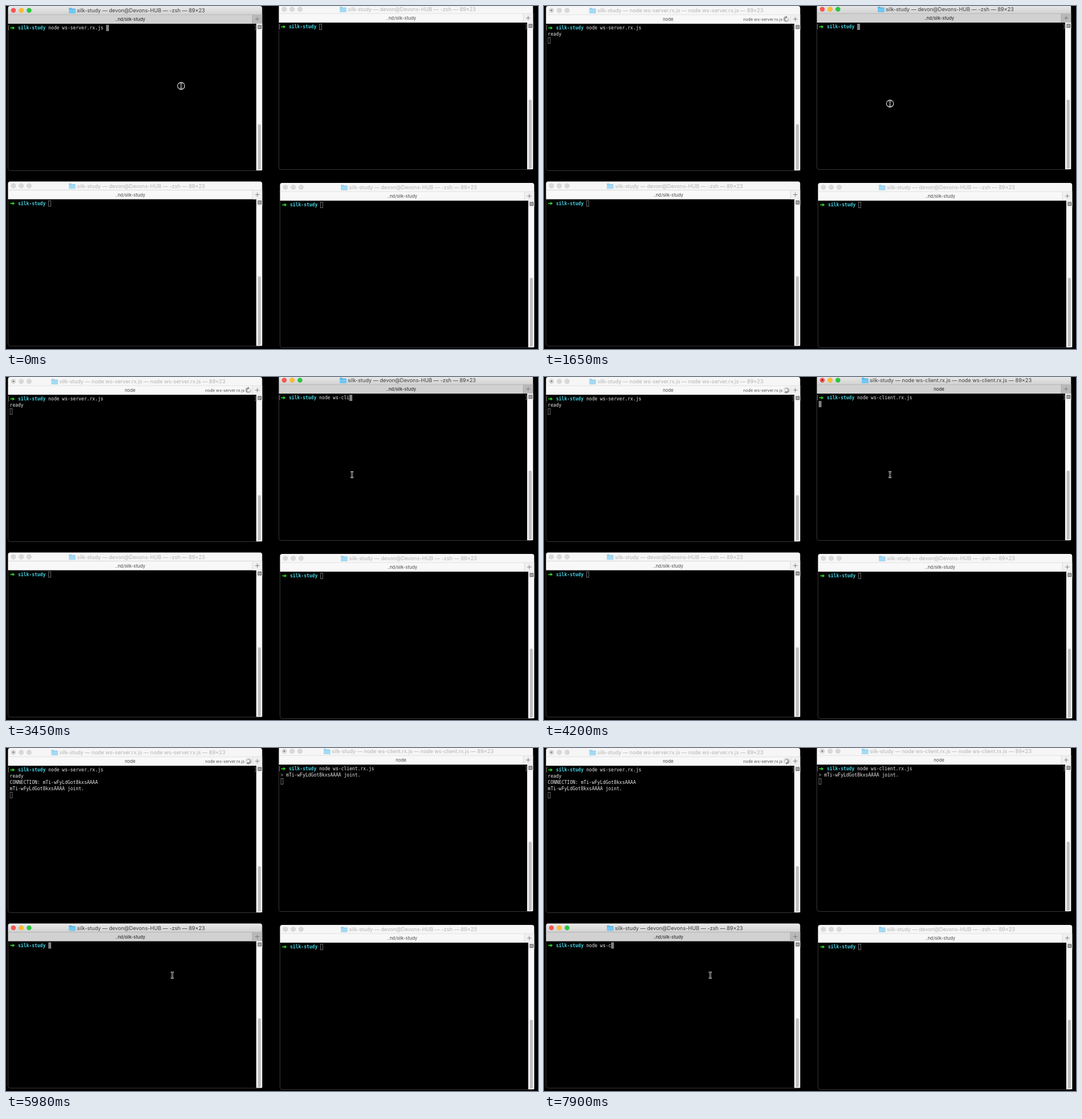
Animation of 931 by 601 pixels, one loop 8 s. Source, as an HTML page:

```html
<!DOCTYPE html>
<html lang="en">
<head>
<meta charset="utf-8">
<title>Four terminals</title>
<style>
html, body { margin: 0; width: 100%; height: 100%; overflow: hidden; background: #000; }
svg { display: block; width: 931px; height: 601px; }
text { white-space: pre; }
.ui { font-family: Inter, Roboto, sans-serif; }
.mono { font: 8px "DejaVu Sans Mono", "Liberation Mono", monospace; fill: #e8e8e8; }
.cwd { font-weight: bold; fill: #45d3e2; }
</style>
</head>
<body>
<svg id="stage" viewBox="0 0 931 601">
  <defs>
    <linearGradient id="bar" x2="0" y2="1">
      <stop stop-color="#e9e9e9"/><stop offset="1" stop-color="#d2d2d2"/>
    </linearGradient>
  </defs>
  <g id="view"></g>
</svg>
<script>
const LOOP = 8000, CELL = 4.816, ROW = 11, LEFT = 6.6, TOP = 33;
const DIR = 'silk-study', ID = 'mTi-wFyLdGot8kxsAAAA';
const SERVER = 'node ws-server.rx.js', CLIENT = 'node ws-client.rx.js';
const IDLE = { title: `${DIR} — devon@Devons-HUB — -zsh — 89×23`, x: 124, tab: '..nd/' + DIR };
const running = (cmd, x) => ({ title: `${DIR} — ${cmd} — ${cmd} — 89×23`, x, tab: 'node', busy: true });
const view = document.getElementById('view');

const rect = (x, y, w, h, fill, extra = '') =>
  `<rect x="${x}" y="${y}" width="${w}" height="${h}" fill="${fill}" ${extra}/>`;
const label = (x, y, size, fill, text, extra = '') =>
  `<text class="ui" x="${x}" y="${y}" font-size="${size}" fill="${fill}" ${extra}>${text}</text>`;
const mono = (col, row, text, cls = '') =>
  `<text class="mono ${cls}" x="${LEFT + col * CELL}" y="${TOP + row * ROW + 8.4}">${text}</text>`;
const clamp = v => Math.max(0, Math.min(1, v));
const ease = v => v * v * (3 - 2 * v);

function lights(active, busy) {
  const colors = active ? ['#fb5652', '#fdbb2d', '#2ac840'] : Array(3).fill('#d9d9d9');
  const discs = colors.map((c, i) =>
    `<circle cx="${13 + i * 13.7}" cy="7.6" r="4.2" fill="${c}" stroke="#000" stroke-opacity=".1" stroke-width=".6"/>`);
  if (busy) discs.push(`<circle cx="13" cy="7.6" r="1.4" fill="${active ? '#7c1512' : '#777'}"/>`);
  return discs.join('');
}

function folder(x, active) {
  return `<g transform="translate(${x} 3)" opacity="${active ? 1 : .6}">
    <path d="M0 1.2Q0 .3 .9 .3H4L5.2 1.5H10.6Q11.5 1.5 11.5 2.4V9Q11.5 9.8 10.6 9.8H.9Q0 9.8 0 9Z" fill="#56b4e3"/>
    ${rect(0, 3, 11.5, 6.8, '#70c8f3', 'rx=".7"')}</g>`;
}

function spinner(k) {
  let spokes = '';
  for (let i = 0; i < 12; i++) {
    const shade = .15 + .8 * ((i + k) % 12) / 11;
    spokes += `<path d="M0-2.6V-5.2" stroke="#222" stroke-opacity="${shade}" stroke-linecap="round" transform="rotate(${i * 30})"/>`;
  }
  return `<g transform="translate(424.3 23.2)">${spokes}</g>`;
}

function scrollbar(top) {
  return rect(438, 31, 10.3, 257, '#f8f8f8') + rect(438, 31, 10.3, 11.5, '#efefef') +
    rect(441, 34, 5.5, 5.5, '#fff', 'stroke="#333" stroke-width=".9"') +
    '<path d="M442 35.7h3.5M442 37.7h3.5" stroke="#333" stroke-width=".9"/>' +
    rect(440.6, top, 5.4, 287 - top, '#c1c1c1', 'rx="2.7"');
}

function prompt(typed, marks) {
  const arrow = '<path d="M7.4 38.4H12.6" stroke="#31d622" stroke-width="1.7"/>' +
    '<path d="M11 35.2L15.4 38.4L11 41.6L12 38.4Z" fill="#31d622"/>';
  const brackets = '<path d="M6 34.5H4.6V42H6M435.2 34.5H436.6V42H435.2" fill="none" stroke="#858585" stroke-width=".8"/>';
  return arrow + (marks ? brackets : '') + mono(3, 0, DIR, 'cwd') + mono(14, 0, typed);
}

function caret(col, row, active) {
  const x = LEFT + col * CELL, y = TOP + row * ROW;
  return active ? rect(x, y, CELL + .2, ROW, '#808080')
    : rect(x + .5, y + .5, CELL - 1, ROW - 1, 'none', 'stroke="#777" stroke-width=".9"');
}

function terminal(w) {
  const { active, info } = w;
  const ink = active ? '#3c3c3c' : '#b4b4b4', tabInk = active ? '#1c1c1c' : '#4a4a4a';
  const line = active ? '#b4b4b4' : '#dcdcdc';
  return `<g transform="translate(${w.x} ${w.y})">` +
    '<path d="M3.5 31V284.5Q3.5 288.5 7.5 288.5H444Q448 288.5 448 284.5V31Z" fill="#000" stroke="#3d3d3d" stroke-width=".9"/>' +
    `<path d="M3.5 15.2V4Q3.5 0 7.5 0H444.3Q448.3 0 448.3 4V15.2Z" fill="${active ? 'url(#bar)' : '#f6f6f6'}"/>` +
    rect(3.5, 15, 444.8, 16, active ? '#d1d1d1' : '#f8f8f8') +
    rect(431, 15, 17.3, 16, active ? '#b9b9b9' : '#f0f0f0') +
    rect(3.5, 14.8, 444.8, .8, line) + rect(430.8, 15, .8, 16, active ? '#a5a5a5' : '#d5d5d5') +
    '<path d="M436 23H443.6M439.8 19.2V26.8" stroke="#777" stroke-width=".9"/>' +
    lights(active, info.busy) + folder(info.x - 14, active) +
    label(info.x, 11, 9.15, ink, info.title) +
    label(217.3, 26, 7.8, tabInk, info.tab, 'text-anchor="middle"') +
    (w.side ? label(417.5, 25.8, 7.1, '#4c4c4c', w.side, 'text-anchor="end"') + spinner(w.k) : '') +
    scrollbar(w.thumb) + caret(w.caret[0], w.caret[1], active) + prompt(w.typed, w.marks) +
    w.lines.map((s, i) => mono(0, i + 1, s)).join('') + '</g>';
}

function shell(x, y, options) {
  return terminal({ x, y, thumb: 166, info: IDLE, typed: '', marks: false, lines: [], ...options });
}

function pointer(k) {
  let x = 306.5, y = 140;
  if (k < 32) {
    const p = ease(clamp((k - 4) / 5));
    x += 299 * p;
    y += 31 * p + 9 * Math.sin(Math.PI * p);
  } else {
    const p = ease(clamp((k - 31) / 4));
    x = 605.5 - 314.5 * p;
    y = 171 + 227 * p;
  }
  const arrow = (k > 5 && k < 11) || (k > 32 && k < 37);
  const beam = 'M-2.6-5Q0-5 0-3V3Q0 5-2.6 5M2.6-5Q0-5 0-3M0 3Q0 5 2.6 5M-1.6 0H1.6';
  const shape = arrow
    ? '<path d="M-.4-1V9.3L2.1 7L3.9 11L5.8 10.1L4.1 6.2H7.2Z" fill="#000" stroke="#fff" stroke-width=".9"/>'
    : `<path d="${beam}" fill="none" stroke="#ddd" stroke-width="2.4"/><path d="${beam}" fill="none" stroke="#000" stroke-width=".9"/>`;
  const click = [0, 11, 37].includes(k) ? '<circle r="6.2" fill="none" stroke="#e4e4e4" stroke-width="1.1"/>' : '';
  return `<g transform="translate(${x} ${y})">${shape}${click}</g>`;
}

function draw(k) {
  const started = k >= 3, clientUp = k >= 27, joined = k >= 30;
  const front = k < 11 ? 0 : k < 37 ? 1 : 2;

  const serverLog = k >= 5 ? ['ready'] : [];
  if (joined) serverLog.push('CONNECTION: ' + ID, ID + ' joint.');
  const clientLog = joined ? ['<tspan fill="#aaa">&gt;</tspan> ' + ID + ' joint.'] : [];

  const typed2 = k < 25 ? CLIENT.slice(0, Math.max(0, k - 12)) : CLIENT + (clientUp ? '' : ' ');
  const count3 = k < 48 ? Math.max(0, k - 41) : Math.min(9, 7 + Math.floor((k - 48) / 2));
  const typed3 = CLIENT.slice(0, count3);

  view.innerHTML =
    shell(0, 0, {
      k, active: front === 0, thumb: 207, marks: true, lines: serverLog,
      info: started ? running(SERVER, 93.5) : IDLE, side: started ? SERVER : '',
      typed: SERVER, caret: started ? [0, serverLog.length + 1] : [SERVER.length + 15, 0]
    }) +
    shell(474, -2, {
      active: front === 1, marks: true, lines: clientLog,
      info: clientUp ? running(CLIENT, 96) : IDLE,
      typed: typed2, caret: clientUp ? [0, clientLog.length + 1] : [14 + typed2.length, 0]
    }) +
    shell(0, 307.5, { active: front === 2, typed: typed3, caret: [14 + count3, 0] }) +
    shell(476, 310, { active: false, caret: [14, 0] }) +
    pointer(k);
}

let last = -1;
function tick() {
  const t = performance.now() % LOOP;
  const k = t < 4490 ? Math.floor(t / 150) : 30 + Math.floor((t - 4490) / 148);
  if (k !== last) draw(last = k);
  requestAnimationFrame(tick);
}
tick();
</script>
</body>
</html>
```
